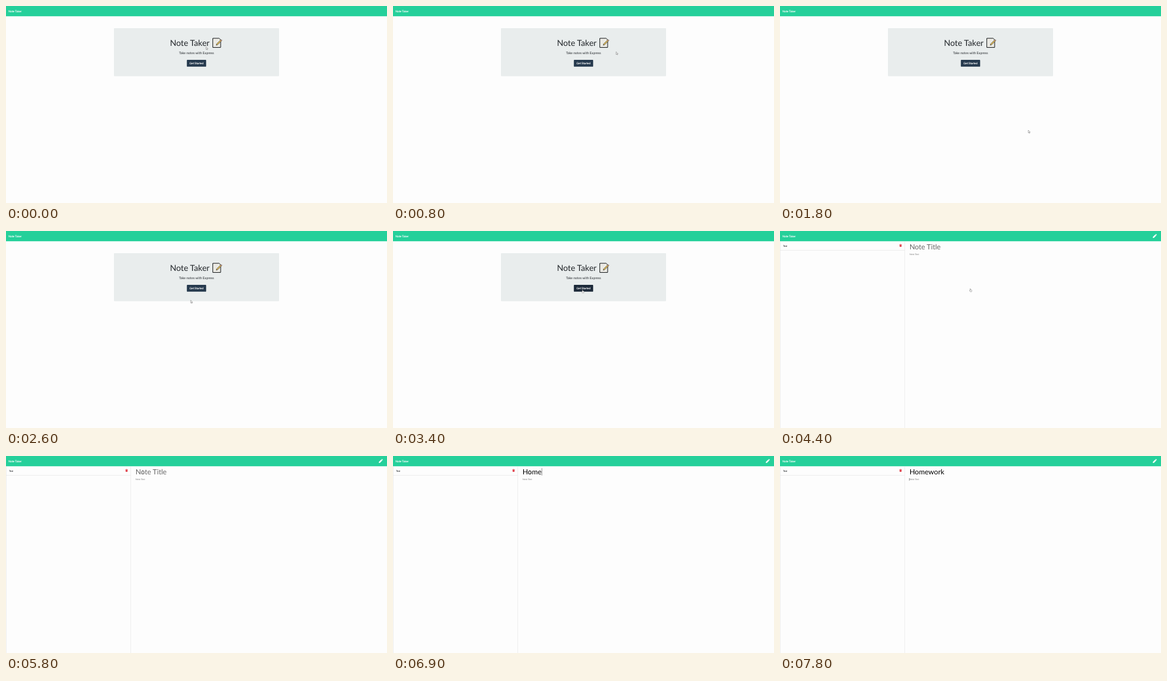
An HTML page that plays this animation: 600 by 311 pixels, repeating every 8000 ms.

```html
<!DOCTYPE html>
<html lang="en">
<head>
<meta charset="utf-8">
<title>Note Taker</title>
<style>
  html, body { margin: 0; width: 100%; height: 100%; overflow: hidden; background: #fdfdfd; }
  svg { display: block; width: 100%; height: 100%; }
  text { font-family: Lato, sans-serif; fill: #212529; text-rendering: geometricPrecision; }
  .mid { text-anchor: middle; }
  .light { fill: #fff; stroke: #fff; stroke-width: .12; }
  .ink { stroke: #16191b; stroke-linejoin: round; }
  .pointer { fill: #fff; stroke: #4a4a4a; stroke-width: .4; }
</style>
</head>
<body>
<svg viewBox="0 0 600 311">
  <rect width="600" height="311" fill="#fdfdfd"/>
  <rect width="600" height="16.2" fill="#25d09a"/>
  <text class="light" x="3.8" y="9.6" font-size="4.39">Note Taker</text>

  <g id="home">
    <rect x="170" y="35" width="260" height="75.7" rx=".9" fill="#e9eded"/>
    <text x="258.2" y="62.6" font-size="13.125">Note Taker</text>
    <path class="ink" d="M325.7 51H335.6L338 53.4V65.4H325.7Z" fill="#efeee8" stroke-width="1"/>
    <path d="M328 54.4h5M328 57h4M328 59.6h3M328 62.4h2" stroke="#d3d3cf" stroke-width=".5"/>
    <g transform="translate(331 62) rotate(-45)">
      <path class="ink" d="M0 0L2.4 -1H11.8V1H2.4Z" fill="#efc75c" stroke-width=".6"/>
      <rect x="10.2" y="-.7" width="1.3" height="1.4" fill="#d08a8f"/>
    </g>
    <text class="mid" x="300" y="76.1" font-size="5.27">Take notes with Express</text>
    <rect id="button" x="284.8" y="85" width="30.4" height="10.8" rx=".9"/>
    <text class="mid light" x="300" y="91.9" font-size="4.39">Get Started</text>
  </g>

  <g id="notes">
    <path d="M.3 16.2V311M196.4 16.2V311M0 30.5H196.4" fill="none" stroke="#e4e5e5" stroke-width=".6"/>
    <text x="4.9" y="24.8" font-size="3.52" font-weight="700">Test</text>
    <g fill="#e0404a">
      <rect x="189.1" y="20.7" width="1.6" height=".6"/>
      <rect x="188" y="21.1" width="3.8" height=".6"/>
      <path d="M188.3 22H191.5L191.3 25H188.5Z"/>
    </g>
    <g transform="translate(587.1 11) rotate(-45)" fill="#fff">
      <path d="M0 0L1.6 -1.1H6.4V1.1H1.6Z"/>
      <rect x="6.8" y="-1.1" width="1.3" height="2.2" rx=".4"/>
    </g>
    <text id="title" x="203.9" y="29.1" font-size="11.25"></text>
    <text x="203.9" y="38.3" font-size="3.52" style="fill:#757575">Note Text</text>
    <rect id="caret" width=".4" fill="#111"/>
  </g>

  <path id="arrow" class="pointer" d="M0 0V4.3L1 3.4L1.7 4.9L2.4 4.6L1.7 3.1H3.1Z"/>
  <path id="hand" class="pointer" d="M1 3.2V.5Q1.4 0 1.8 .5V2L3.5 2.4Q3.9 2.5 3.8 3.1L3.4 5.1H1.4L.1 3.2Q.3 2.6 1 3.2Z"/>
  <path id="beam" class="pointer" d="M-1 -2.6H1M0 -2.6V2.6M-1 2.6H1"/>
</svg>
<script>
const LOOP = 8000, STEP = 100;
const PRESS = 4200, OPEN = 4400, FOCUS = 5200, BLINK = 5800, TAB = 7800;
const $ = id => document.getElementById(id);
const show = (el, on) => el.setAttribute("display", on ? "inline" : "none");
const ease = u => u * u * (3 - 2 * u);
const clamp = u => Math.min(1, Math.max(0, u));

function setAttrs(el, attrs) {
  for (const name in attrs) el.setAttribute(name, attrs[name]);
}

// Pointer moves; it rests in between.
const home = { x: 315, y: 64.3 };
const moves = [
  { from: 0, to: 400, x: 294, y: 90.6 },
  { from: 400, to: 1000, x: 371.4, y: 65.8 },
  { from: 1400, to: 1500, x: 401, y: 194.6 },
  { from: 1700, to: 1800, x: 391, y: 196 },
  { from: 1800, to: 2700, x: 287.3, y: 106.3 },
  { from: 2900, to: 3400, x: 297, y: 92.6 },
  { from: 3800, to: 4000, x: 298.3, y: 90.8 },
  { from: 4500, to: 5100, x: 215.5, y: 25.2 }
];

// Bursts of typing, one letter per step.
const bursts = [[6300, "Ho"], [6700, "m"], [6900, "e"], [7300, "work"]];

function pointerAt(t) {
  let { x, y } = home;
  for (const m of moves) {
    const u = ease(clamp((t - m.from) / (m.to - m.from)));
    x += (m.x - x) * u;
    y += (m.y - y) * u;
  }
  return { x, y };
}

function typedAt(t) {
  return bursts.map(([at, word]) => word.slice(0, Math.max(0, (t - at) / STEP + 1))).join("");
}

function drawPointer(t, { x, y }, hover) {
  const kind = t > OPEN + STEP ? "beam" : hover || t >= OPEN ? "hand" : "arrow";
  for (const id of ["arrow", "hand", "beam"]) show($(id), id === kind && t < 7000);
  $(kind).setAttribute("transform", `translate(${x} ${y})`);
}

function drawButton(t, hover) {
  const pressed = t >= PRESS;
  setAttrs($("button"), {
    fill: pressed ? "#172230" : hover && t > 1000 ? "#1d2a3a" : "#263a4e",
    stroke: pressed ? "#5b6b7c" : "none",
    "stroke-width": .4
  });
}

function drawForm(t) {
  const typed = typedAt(t), inBody = t >= TAB;
  const title = $("title"), caret = $("caret");
  title.textContent = typed || "Note Title";
  title.style.fill = typed ? "#000" : "#666";
  setAttrs(caret, {
    x: typed && !inBody ? 204 + title.getComputedTextLength() : 203.7,
    y: inBody ? 35 : 19.2,
    height: inBody ? 4 : 11.6
  });
  show(caret, t >= FOCUS && (t < BLINK || typed));
}

function draw(time) {
  const t = Math.floor(time % LOOP / STEP) * STEP;
  const p = pointerAt(t);
  const hover = t < OPEN && Math.abs(p.x - 300) < 15 && Math.abs(p.y - 90.4) < 5.4;
  show($("home"), t < OPEN);
  show($("notes"), t >= OPEN);
  drawButton(t, hover);
  if (t >= OPEN) drawForm(t);
  drawPointer(t, p, hover);
}

const start = performance.now();
function tick() {
  draw(performance.now() - start);
  requestAnimationFrame(tick);
}
tick();
</script>
</body>
</html>
```
